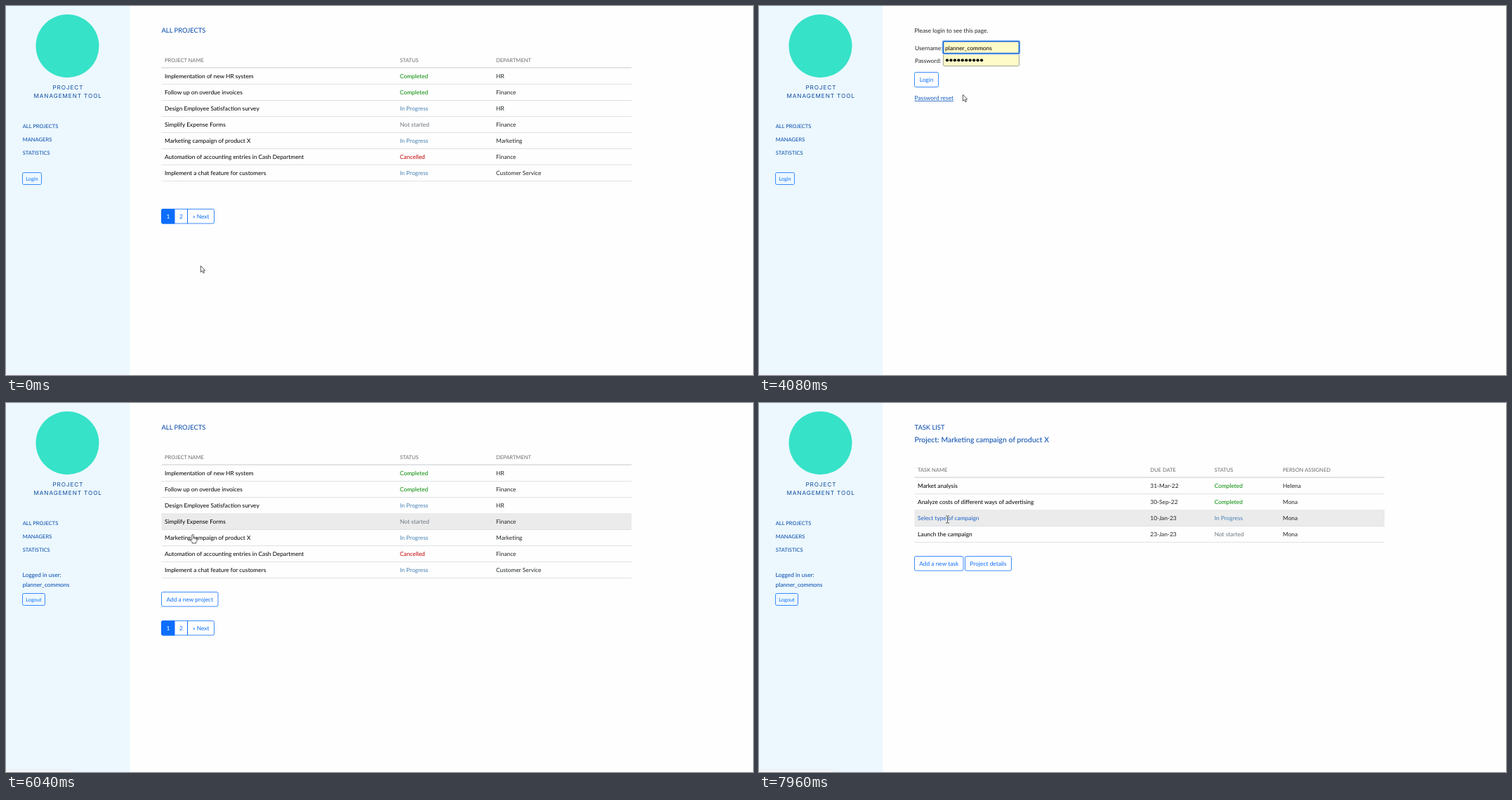
An HTML page with a canvas for the animation above (8 s loop, 1064 by 526 pixels).

```html
<!DOCTYPE html>
<html lang="en">
<head>
<meta charset="utf-8">
<title>Project management tool</title>
<style>
  html, body { margin: 0; width: 100%; height: 100%; overflow: hidden; background: #fefefe; }
  canvas { display: block; }
</style>
</head>
<body>
<canvas id="stage" width="1064" height="526"></canvas>
<script>
const ctx = document.getElementById('stage').getContext('2d');
const LOOP = 8000;
const BODY = 8.37, CAPS = 7.55, SMALL = 7.35;
const COBALT = '#0047ab', BLUE = '#0d6efd', INK = '#212529', GREY = '#6b6b70';
const SANS = 'Lato, sans-serif', UI = '"Open Sans", sans-serif';
const USER = 'planner_commons';
const STATUS = {
  Completed: '#008a00', 'In Progress': '#4682b4', 'Not started': '#6c757d', Cancelled: '#c00000'
};

const PROJECTS = {
  top: 88, cols: [226, 561, 698], statusCol: 1,
  head: ['PROJECT NAME', 'STATUS', 'DEPARTMENT'],
  rows: [
    ['Implementation of new HR system', 'Completed', 'HR'],
    ['Follow up on overdue invoices', 'Completed', 'Finance'],
    ['Design Employee Satisfaction survey', 'In Progress', 'HR'],
    ['Simplify Expense Forms', 'Not started', 'Finance'],
    ['Marketing campaign of product X', 'In Progress', 'Marketing'],
    ['Automation of accounting entries in Cash Department', 'Cancelled', 'Finance'],
    ['Implement a chat feature for customers', 'In Progress', 'Customer Service']
  ]
};
const TASKS = {
  top: 106, cols: [226, 557.3, 648.7, 746], statusCol: 2,
  head: ['TASK NAME', 'DUE DATE', 'STATUS', 'PERSON ASSIGNED'],
  rows: [
    ['Market analysis', '31-Mar-22', 'Completed', 'Helena'],
    ['Analyze costs of different ways of advertising', '30-Sep-22', 'Completed', 'Mona'],
    ['Select type of campaign', '10-Jan-23', 'In Progress', 'Mona'],
    ['Launch the campaign', '23-Jan-23', 'Not started', 'Mona']
  ]
};

// Time, tip position, pointer shape
const POINTER = [
  [0, 277, 370, 'arrow'], [1010, 265, 364, 'arrow'], [1160, 235, 349, 'arrow'],
  [1300, 190, 328, 'arrow'], [1430, 148, 310, 'arrow'], [1550, 105, 288, 'arrow'],
  [1680, 75, 267, 'arrow'], [1800, 56, 251, 'arrow'], [1930, 45.7, 243.5, 'hand'],
  [2910, 62, 238, 'arrow'], [3040, 138, 197, 'arrow'], [3170, 216, 159, 'arrow'],
  [3310, 247, 144.5, 'arrow'], [3440, 273, 134, 'arrow'], [3560, 290, 126, 'arrow'],
  [4340, 284, 124, 'arrow'], [4470, 268, 120, 'arrow'], [4600, 250, 111, 'hand'],
  [4720, 240, 106, 'hand'], [4840, 235, 103.5, 'hand'],
  [5790, 241, 120, 'hand'], [5920, 256, 162, 'hand'], [6040, 266, 187, 'hand'],
  [6700, 266, 190, 'arrow'], [7240, 266, 190.5, 'hand'],
  [7440, 267, 169, 'arrow'], [7580, 267, 168, 'hand'], [7960, 268.5, 166, 'beam']
];
// Time, hovered row, whether its link is lit
const HOVER = [
  [0, -1, 0], [5380, 0, 1], [5790, 1, 1], [5920, 3, 0], [6160, 4, 1],
  [6700, 3, 0], [7440, 2, 0], [7580, 2, 1]
];
const STATUS_BAR = [[0, 0], [5110, 147], [5380, 94], [6700, 0], [7960, 107]];

const latest = (steps, t) => steps.filter(s => s[0] <= t).pop();
const during = (t, from, to) => t >= from && t < to;

// y is the middle of the capital letters
function text(str, x, y, { size = BODY, color = INK, font = SANS, align = 'left', spacing = 0 } = {}) {
  ctx.font = `${size}px ${font}`;
  ctx.letterSpacing = spacing + 'px';
  ctx.textAlign = align;
  ctx.fillStyle = color;
  ctx.fillText(str, x, y + size * 0.36);
}

function rect(x, y, w, h, color) {
  ctx.fillStyle = color;
  ctx.fillRect(x, y, w, h);
}

function box(x, y, w, h, r, fill, stroke, width = 1) {
  ctx.beginPath();
  ctx.roundRect(x, y, w, h, r);
  if (fill) { ctx.fillStyle = fill; ctx.fill(); }
  if (stroke) { ctx.strokeStyle = stroke; ctx.lineWidth = width; ctx.stroke(); }
}

function button(label, x, y, w, h, { size = BODY, lit = 0, ring = false, r = 2 } = {}) {
  if (ring) box(x - 0.5, y - 0.5, w + 1, h + 1, r + 1, null, '#8bbcfe', 2);
  box(x, y, w, h, r, `rgba(13,110,253,${lit})`, BLUE, 0.8);
  text(label, x + w / 2, y + h / 2, { size, color: lit > 0.4 ? '#fff' : BLUE, align: 'center' });
}

function sidebar(t) {
  rect(0, 0, 176.5, 526, '#ecf8fe');
  ctx.fillStyle = '#36e2c8';
  ctx.beginPath();
  ctx.arc(87.5, 57, 45, 0, Math.PI * 2);
  ctx.fill();
  const brand = { size: 8.2, color: '#0c4a9e', font: 'Inter, sans-serif', align: 'center', spacing: 0.9 };
  text('PROJECT', 88.4, 116.5, brand);
  text('MANAGEMENT TOOL', 88.2, 128, brand);
  ['ALL PROJECTS', 'MANAGERS', 'STATISTICS'].forEach((item, i) =>
    text(item, 23.7, 171 + 19 * i, { size: CAPS, color: COBALT }));

  if (t >= 5380) {
    text('Logged in user:', 23.5, 245, { color: COBALT });
    text(USER, 23.5, 258.5, { color: COBALT });
    button('Logout', 23.5, 271.5, 32, 17, { size: SMALL });
  } else {
    const lit = during(t, 2060, 2190) ? 0.6 : during(t, 2190, 2910) ? 1 : 0;
    button('Login', 23.5, 237.5, 27, 17, { size: SMALL, lit, ring: during(t, 2480, 2620) });
  }
}

function table({ top, cols, statusCol, head, rows }, t) {
  const [, hovered, linkLit] = latest(HOVER, t);
  head.forEach((label, i) => text(label, cols[i], top - 11, { size: CAPS, color: GREY }));
  rows.forEach((row, r) => {
    const y = top + 23 * r;
    if (r === hovered) rect(221.5, y, 669.5, 23, '#ebebeb');
    row.forEach((cell, c) => {
      let color = c ? INK : '#000';
      if (c === statusCol) color = STATUS[cell];
      if (!c && r === hovered && linkLit) color = '#1a5fc4';
      text(cell, cols[c], y + 12.3, { color });
    });
    rect(221.5, y + 23, 669.5, 1, '#dee2e6');
  });
  rect(221.5, top - 0.5, 669.5, 1, '#c9cbce');
}

function pagination(y) {
  box(221.5, y, 75, 20.5, 2, null, BLUE, 0.8);
  box(221.5, y, 18.5, 20.5, [2, 0, 0, 2], BLUE, BLUE);
  rect(258, y, 1, 20.5, BLUE);
  const mid = y + 10.5;
  text('1', 230.8, mid, { color: '#fff', align: 'center' });
  text('2', 249.3, mid, { color: BLUE, align: 'center' });
  text('» Next', 277.7, mid, { color: BLUE, align: 'center' });
}

function projectsPage(t) {
  const loggedIn = t >= 5380;
  text('ALL PROJECTS', 221.5, 34.7, { size: 9.4, color: COBALT });
  table(PROJECTS, t);
  if (loggedIn) button('Add a new project', 221.5, 269.5, 80.5, 20.5);
  pagination(loggedIn ? 310.5 : 289.5);
}

function tasksPage(t) {
  text('TASK LIST', 221.5, 34.7, { size: 9.4, color: COBALT });
  text('Project: Marketing campaign of product X', 221.5, 52.5, { size: 10.5, color: COBALT });
  table(TASKS, t);
  button('Add a new task', 221.5, 218.5, 69.5, 20.5);
  button('Project details', 293.5, 218.5, 66, 20.5);
}

function keyIcon(x, y) {
  ctx.strokeStyle = '#77777c';
  ctx.lineWidth = 0.9;
  ctx.beginPath();
  ctx.arc(x + 2.2, y, 2, 0, Math.PI * 2);
  ctx.moveTo(x + 4.2, y);
  ctx.lineTo(x + 9, y);
  ctx.moveTo(x + 8, y);
  ctx.lineTo(x + 8, y + 2);
  ctx.stroke();
}

function savedLogins(t) {
  rect(263, 67.5, 114.5, 89.5, '#fff');
  if (t >= 3560) rect(264, 115, 113, 23.5, '#e4e4e8');
  ['owner', 'operator_commons', USER].forEach((name, i) => {
    const y = 75.2 + 23.5 * i;
    keyIcon(266.5, y - 0.7);
    text(name, 278, y, { size: 6.4, color: '#000', font: UI });
    text('From this website', 278, y + 10, { size: 6.3, color: '#606066', font: UI });
  });
  rect(263.5, 138.5, 114, 18.5, '#ebebeb');
  rect(263.5, 138, 114, 1, '#d2d2d2');
  text('View Saved Logins', 320.3, 148.2, { size: 6.4, color: '#15141a', font: UI, align: 'center' });
  box(263.5, 67.5, 114, 89, 0, null, '#adadad');
}

function loginPage(t) {
  const filled = t >= 3950, focused = t < 4980;
  const paper = filled ? '#fffbc8' : '#fff';
  const field = (y, edge, width) => box(262.5, y, 108, 17, 1, paper, edge, width);
  text('Please login to see this page.', 221.5, 34.8);
  text('Username:', 222, 59.5);
  text('Password:', 222, 77.5);
  field(68.5, '#a5a594');
  if (focused) {
    box(261.5, 49.5, 110, 19, 2, null, '#b5d3fa', 2);
    field(50.5, '#0a5fd8', 1.6);
  } else {
    field(50.5, '#a5a594');
  }
  if (filled) {
    text(USER, 265, 59.5, { color: '#000' });
    ctx.fillStyle = '#000';
    for (let i = 0; i < 10; i++) {
      ctx.beginPath();
      ctx.arc(268 + 5.45 * i, 77.3, 2.15, 0, Math.PI * 2);
      ctx.fill();
    }
  }
  if (during(t, 2740, 3170)) rect(265, 54, 0.8, 10, '#000');
  if (during(t, 4340, 4720)) rect(331, 54, 0.8, 10, '#000');

  button('Login', 221.5, 94.5, 34, 21, { lit: t >= 4600 ? 1 : 0, ring: t >= 4980 });
  const link = 'Password reset';
  text(link, 221.5, 131.3, { color: '#1259bd' });
  rect(221.5, 135, ctx.measureText(link).width, 0.8, '#1259bd');
  if (during(t, 3310, 3950)) savedLogins(t);
}

const SHAPES = {
  arrow: new Path2D('M.4 .4V9.4L2.5 7.5L4 10.8L5.5 10.1L4 7H6.6Z'),
  hand: new Path2D('M-1.2 1.2Q0 -.5 1.2 1.2V4.9Q2.3 4.2 2.9 5.2Q4 4.6 4.5 5.7Q6 5.4 6 7V9.3L4.8 11.2V12.9H-.8V11.5L-3.6 8.2Q-3.4 6.6 -2.2 7.4L-1.2 8.3Z'),
  fingers: new Path2D('M1.2 4.9V7M2.9 5.2V7.2M4.5 5.7V7.4'),
  beam: new Path2D('M-2.5 -5H-.7L0 -4.4L.7 -5H2.5M0 -4.4V4.4M-2.5 5H-.7L0 4.4L.7 5H2.5')
};

function pointer(t) {
  const [, x, y, shape] = latest(POINTER, t);
  ctx.save();
  ctx.translate(x, y);
  ctx.lineJoin = 'round';
  ctx.lineWidth = 0.75;
  ctx.strokeStyle = '#222';
  ctx.fillStyle = '#fff';
  if (shape !== 'beam') ctx.fill(SHAPES[shape]);
  ctx.stroke(SHAPES[shape]);
  if (shape === 'hand') {
    ctx.lineWidth = 0.6;
    ctx.stroke(SHAPES.fingers);
  }
  ctx.restore();
}

function statusBar(t) {
  const width = latest(STATUS_BAR, t)[1];
  if (width) box(-2, 523, width + 2, 6, [0, 2, 0, 0], '#f9f9fb', '#e2e4e7', 0.8);
}

function draw(t) {
  ctx.textRendering = 'geometricPrecision';
  rect(0, 0, 1064, 526, '#fefefe');
  sidebar(t);
  if (during(t, 2620, 5380)) loginPage(t);
  else if (t >= 6700) tasksPage(t);
  else projectsPage(t);
  statusBar(t);
  pointer(t);
}

const start = performance.now();
function tick() {
  draw((performance.now() - start) % LOOP);
  requestAnimationFrame(tick);
}
tick();
</script>
</body>
</html>
```
